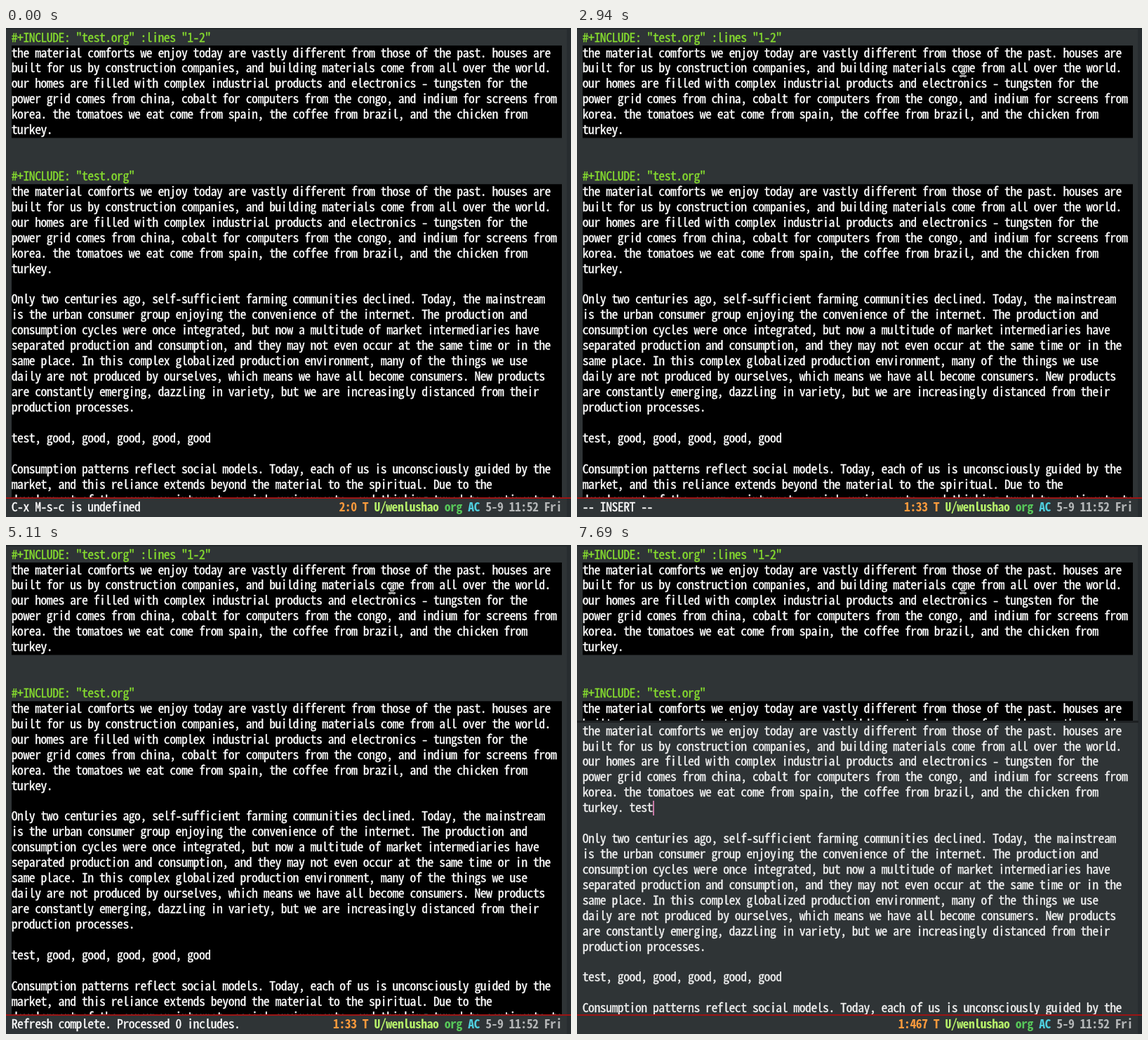
Recreate the animation shown at these times as an HTML page with a canvas. Size 805 px wide and 696 px high, loop 8 s.

```html
<!DOCTYPE html>
<html lang="en">
<head>
<meta charset="utf-8">
<title>Editor transclusion</title>
<style>
html, body { margin: 0; width: 100%; height: 100%; overflow: hidden; background: #2f3436; }
canvas { display: block; width: 805px; height: 696px; }
</style>
</head>
<body>
<canvas id="stage"></canvas>
<script>
const W = 805, H = 696, LOOP = 8000;
const LEFT = 8, CELL = 8.35, ROW = 21.93, BASE = 16.6;
const BG = '#2f3436', PINK = '#c87aa6', WHITE = '#ffffff', GREEN = '#86dc2f';
const MONO = '"Noto Sans Mono CJK SC", "Noto Sans Mono CJK JP", "Noto Sans Mono", monospace';
const WIDE = '"Noto Sans Mono", "DejaVu Sans Mono", monospace';

const canvas = document.getElementById('stage');
const ctx = canvas.getContext('2d');
const dpr = window.devicePixelRatio || 1;
canvas.width = W * dpr;
canvas.height = H * dpr;
ctx.scale(dpr, dpr);
ctx.textAlign = 'center';
ctx.lineJoin = ctx.lineCap = 'round';

// Font size at which one character is exactly one cell wide
function fit(family) {
  ctx.font = `100px ${family}`;
  return CELL * 100 / ctx.measureText('m').width;
}
const textFont = `${fit(MONO) * 1.06}px ${MONO}`;
const markFont = `${fit(WIDE)}px ${WIDE}`;

const HEAD_LINES = '#+INCLUDE: "test.org" :lines "1-2"';
const HEAD_ALL = '#+INCLUDE: "test.org"';
const INTRO = [
  'the material comforts we enjoy today are vastly different from those of the past. houses are',
  'built for us by construction companies, and building materials come from all over the world.',
  'our homes are filled with complex industrial products and electronics – tungsten for the',
  'power grid comes from china, cobalt for computers from the congo, and indium for screens from',
  'korea. the tomatoes we eat come from spain, the coffee from brazil, and the chicken from',
  'turkey.'
];
const REST = [
  '',
  'Only two centuries ago, self-sufficient farming communities declined. Today, the mainstream',
  'is the urban consumer group enjoying the convenience of the internet. The production and',
  'consumption cycles were once integrated, but now a multitude of market intermediaries have',
  'separated production and consumption, and they may not even occur at the same time or in the',
  'same place. In this complex globalized production environment, many of the things we use',
  'daily are not produced by ourselves, which means we have all become consumers. New products',
  'are constantly emerging, dazzling in variety, but we are increasingly distanced from their',
  'production processes.',
  '',
  'test, good, good, good, good, good',
  '',
  'Consumption patterns reflect social models. Today, each of us is unconsciously guided by the',
  'market, and this reliance extends beyond the material to the spiritual. Due to the',
  'development of the consumer internet, social environments, and thinking tuned to sentiments to'
];

function rect(x, y, w, h, color) {
  ctx.fillStyle = color;
  ctx.fillRect(x, y, w, h);
}

// One character per cell; a hairline outline gives the medium weight
function put(str, x, top, color, bold) {
  ctx.fillStyle = ctx.strokeStyle = color;
  ctx.lineWidth = 0.35;
  const y = Math.round(top + BASE);
  [...str].forEach((ch, i) => {
    if (ch === ' ') return;
    const cx = x + (i + 0.5) * CELL;
    ctx.font = (bold ? 'bold ' : '') + (/[–‘’]/.test(ch) ? markFont : textFont);
    ctx.fillText(ch, cx, y);
    if (!bold) ctx.strokeText(ch, cx, y);
  });
}

const colX = col => LEFT + col * CELL;
const rowY = row => 3 + row * ROW;

function lines(list, top, color) {
  list.forEach((s, i) => put(s, LEFT, top + i * ROW, color));
}

function clipped(y, h, draw) {
  ctx.save();
  ctx.beginPath();
  ctx.rect(0, y, W, h);
  ctx.clip();
  draw();
  ctx.restore();
}

function block(col, top, ch) {
  rect(Math.round(colX(col)), Math.round(top), 9, 21, PINK);
  put(ch, colX(col), top, BG);
}

function bar(col, top) {
  rect(Math.round(colX(col)), Math.round(top), 2, 21, PINK);
}

function upperCursor(t) {
  const top = rowY(0);
  if (t >= 310 && t < 370) block(0, rowY(7), ' ');
  else if (t >= 370 && t < 1700) {
    const step = Math.min(12, Math.floor((t - 370) / 60));
    const col = Math.round(33 * step / 12);
    block(col, top, HEAD_LINES[col]);
  } else if (t >= 2200 && t < 2380) block(33, top, '"');
  else if ((t >= 2380 && t < 2940) || (t >= 3250 && t < 3750) || (t >= 4310 && t < 4800)) bar(33, top);
}

function drawUpper(t, bottom) {
  clipped(0, bottom, () => {
    rect(LEFT, rowY(1), 784, 6 * ROW, '#000');
    rect(LEFT, rowY(10), 784, bottom - rowY(10), '#000');
    put(HEAD_LINES, LEFT, rowY(0), GREEN);
    lines(INTRO, rowY(1), WHITE);
    put(HEAD_ALL, LEFT, rowY(9), GREEN);
    lines(INTRO.concat(REST), rowY(10), WHITE);
    if (t < 5170) upperCursor(t);
  });
}

function typedText(t) {
  const keys = [6830, 7390, 7450, 7630, 7690];
  return ' test'.slice(0, keys.filter(k => t >= k).length);
}

function drawLower(t) {
  const top = 254, last = top + 5 * ROW;
  rect(0, 250, 800, 3, '#1d2022');
  clipped(253, 415, () => {
    const typed = typedText(t);
    const body = INTRO.concat(REST);
    body[5] += typed;
    lines(body, top, '#f2f2f2');
    if (t < 5790 || (t >= 6220 && t < 6650)) block(6, last, '.');
    else if (t >= 6650) bar(7 + typed.length, last);
  });
}

function drawPointer() {
  const beam = new Path2D('M546.5 54.5Q549.5 54.5 550 57Q550.5 54.5 553.5 54.5M550 56V67' +
    'M546.5 68.5Q549.5 68.5 550 66Q550.5 68.5 553.5 68.5M547.5 63.5H552.5');
  ctx.strokeStyle = '#f4f4f4';
  ctx.lineWidth = 2.8;
  ctx.stroke(beam);
  ctx.strokeStyle = '#222';
  ctx.lineWidth = 1;
  ctx.stroke(beam);
}

function drawEcho(t, top) {
  const say = s => put(s, LEFT, top, WHITE);
  if (t < 310) say('C-x M-s-c is undefined');
  else if ((t >= 2380 && t < 3250) || (t >= 6650 && t < 6830)) say('-- INSERT --');
  else if (t >= 5110 && t < 5170) say('Refresh complete. Processed 0 includes.');
  else if (t >= 5170 && t < 6650) {
    say('Position saved to mark ring, go back with ‘');
    ctx.strokeStyle = '#50575a';
    ctx.lineWidth = 1;
    ctx.strokeRect(367.5, 671.5, 51, 20);
    ctx.font = '16px "DejaVu Sans Mono", monospace';
    ctx.fillStyle = '#bdd3dc';
    ctx.fillText('C-c &', 392.5, Math.round(top + BASE));
    put('’.', 419, top, WHITE);
  }
}

function drawStatus(t, top) {
  const pos = t < 1580 ? '2:0' : t < 5480 ? '1:33' : t < 7450 ? '1:464' : '1:467';
  const parts = [
    [pos + ' T', '#ff9a3c'],
    ['U/wenlushao', '#b6f06a'],
    ['org', '#58c95a'],
    ['AC', '#4fcfe0'],
    ['5-9 11:52 Fri', '#b4b6b7']
  ];
  const total = parts.reduce((n, p) => n + p[0].length + 1, -1);
  let x = 792 - total * CELL;
  for (const [s, color] of parts) {
    put(s, x, top, color, true);
    x += (s.length + 1) * CELL;
  }
}

function draw(t) {
  const split = t >= 5170;
  rect(0, 0, W, H, BG);
  rect(799, 0, 6, H, '#272c2f');
  rect(0, 0, W, 2, '#23282a');
  drawUpper(t, split ? 250 : 668);
  if (split) drawLower(t);
  if (t >= 1520) drawPointer();
  rect(0, 668, W, 2, '#9c1414');
  drawEcho(t, 671);
  drawStatus(t, 671);
}

function frame(now) {
  draw(now % LOOP);
  requestAnimationFrame(frame);
}
draw(0);
requestAnimationFrame(frame);
</script>
</body>
</html>
```
